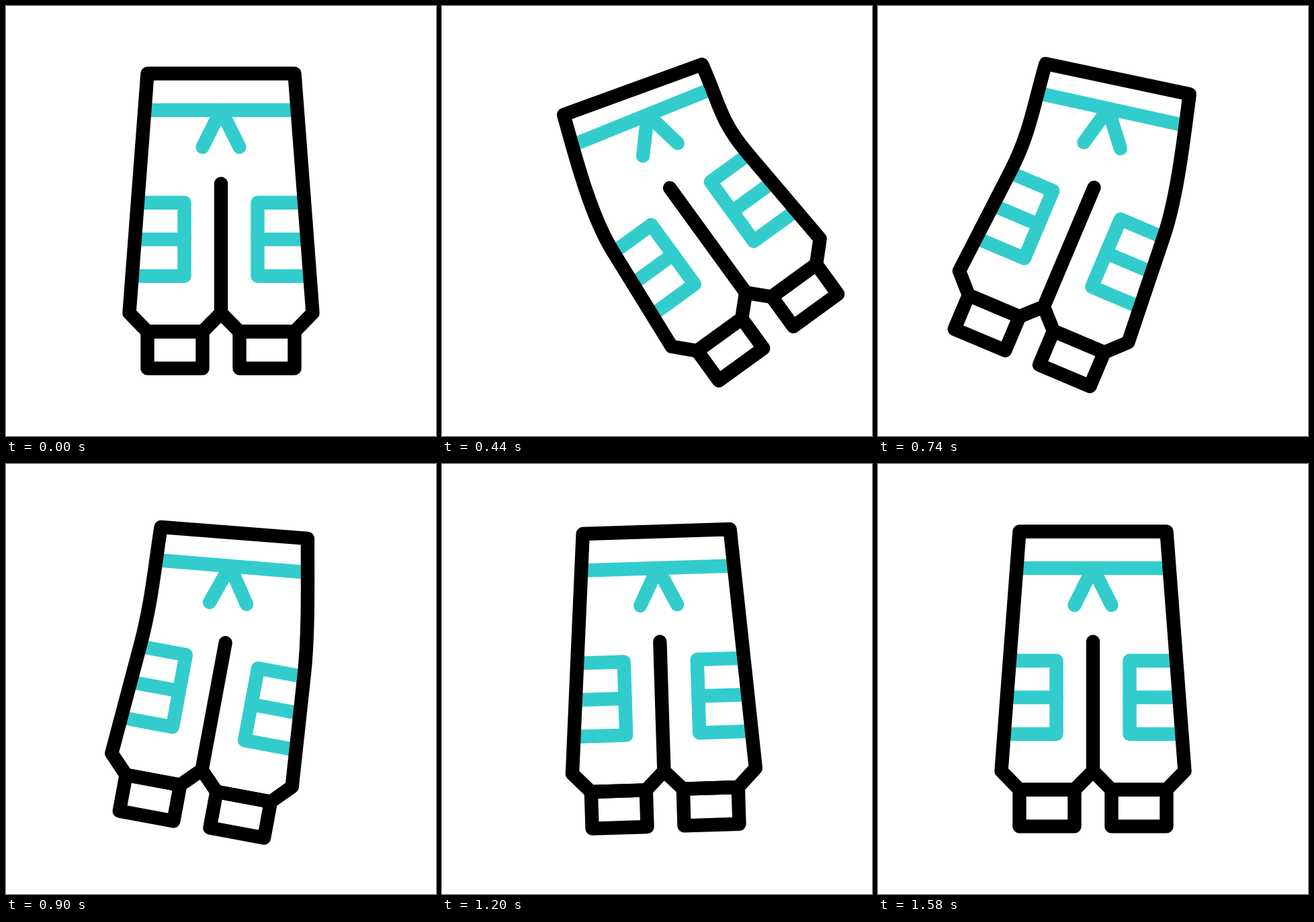
Write an HTML page with a canvas that moves like this. It is 640x640 px and loops after 2400 ms.

```html
<!DOCTYPE html>
<html>
<head>
<meta charset="utf-8">
<style>
  html, body { margin: 0; width: 100%; height: 100%; overflow: hidden; background: #fff; }
  canvas { display: block; width: 100vmin; height: 100vmin; }
</style>
</head>
<body>
<canvas id="stage" width="640" height="640"></canvas>
<script>
const ctx = document.getElementById('stage').getContext('2d');
const LOOP = 2400;
const TIMES = [0, 440, 760, 1060, 1360, 1580];
const SWING = [0, -20, 12.3, -5, 2, 0];
const PIVOT = [320, 128];

// Each part bends by [dx, dy, degrees] at the first and the second swing.
const PARTS = {
  waist:   { anchor: [320, 100],   bend: [[-32.6, 11.9, 0], [32.5, 0.8, 0]] },
  belt:    { anchor: [320, 155],   bend: [[-33, 0.4, -2], [35, -7.6, 0.5]] },
  strings: { anchor: [320, 155],   bend: [[-24.7, 0.1, 0], [28, -7, -2.5]] },
  legs:    { anchor: [320, 360.5], bend: [[-4.5, 0.5, -16], [13, 0.5, 11.2]] }
};

function keyed(values, t) {
  const i = TIMES.findIndex(k => k > t);
  if (i < 0) return 0;
  const x = (t - TIMES[i - 1]) / (TIMES[i] - TIMES[i - 1]);
  return values[i - 1] + (values[i] - values[i - 1]) * x * x * (3 - 2 * x);
}

function rotate([x, y], [cx, cy], degrees) {
  const a = degrees * Math.PI / 180, c = Math.cos(a), s = Math.sin(a);
  return [cx + (x - cx) * c - (y - cy) * s, cy + (x - cx) * s + (y - cy) * c];
}

// Returns a function that moves resting points of a part to their place at time t.
function poser(part, t) {
  const { anchor, bend: [first, second] } = PARTS[part];
  const [dx, dy, turn] = first.map((v, i) => keyed([0, v, second[i], 0, 0, 0], t));
  const swing = keyed(SWING, t);
  return (x, y) => {
    const [px, py] = rotate([x, y], anchor, turn);
    return rotate([px + dx, py + dy], PIVOT, swing);
  };
}

function line(pose, points, closed) {
  ctx.beginPath();
  points.forEach(p => ctx.lineTo(...pose(...p)));
  if (closed) ctx.closePath();
  ctx.stroke();
}

function draw(t) {
  const [waist, belt, strings, legs] = Object.keys(PARTS).map(p => poser(p, t));
  ctx.fillStyle = '#fff';
  ctx.fillRect(0, 0, 640, 640);
  ctx.lineWidth = 20.4;
  ctx.lineJoin = 'round';

  ctx.strokeStyle = '#33cccc';
  ctx.lineCap = 'butt';
  line(belt, [[210, 155], [430, 155]]);
  ctx.lineCap = 'round';
  line(strings, [[292.5, 210], [320, 155], [347.5, 210]]);
  line(legs, [[196.5, 292.8], [265.5, 292.8], [265.5, 402], [188, 402]]);
  line(legs, [[192, 347.4], [265.5, 347.4]]);
  line(legs, [[443, 292.8], [374.5, 292.8], [374.5, 402], [452.4, 402]]);
  line(legs, [[447, 347.4], [374.5, 347.4]]);

  // The sides curve from the waist to the pockets and stay straight below.
  ctx.strokeStyle = '#000';
  ctx.beginPath();
  ctx.moveTo(...waist(210.5, 100.5));
  ctx.lineTo(...waist(429.5, 100.5));
  ctx.bezierCurveTo(...waist(434.3, 163.5), ...legs(439.1, 227), ...legs(443.9, 290));
  [[456.5, 457], [429.5, 484.7], [347.5, 484.7], [320, 457],
   [292.5, 484.7], [210.5, 484.7], [183.5, 457], [196.1, 290]]
    .forEach(p => ctx.lineTo(...legs(...p)));
  ctx.bezierCurveTo(...legs(200.9, 227), ...waist(205.7, 163.5), ...waist(210.5, 100.5));
  ctx.closePath();
  ctx.stroke();
  line(legs, [[320, 264.5], [320, 457]]);
  for (const x of [210.5, 347.5])
    line(legs, [[x, 484.7], [x + 82, 484.7], [x + 82, 539.4], [x, 539.4]], true);
}

const start = performance.now();
function frame() {
  draw((performance.now() - start) % LOOP);
  requestAnimationFrame(frame);
}
frame();
</script>
</body>
</html>
```
